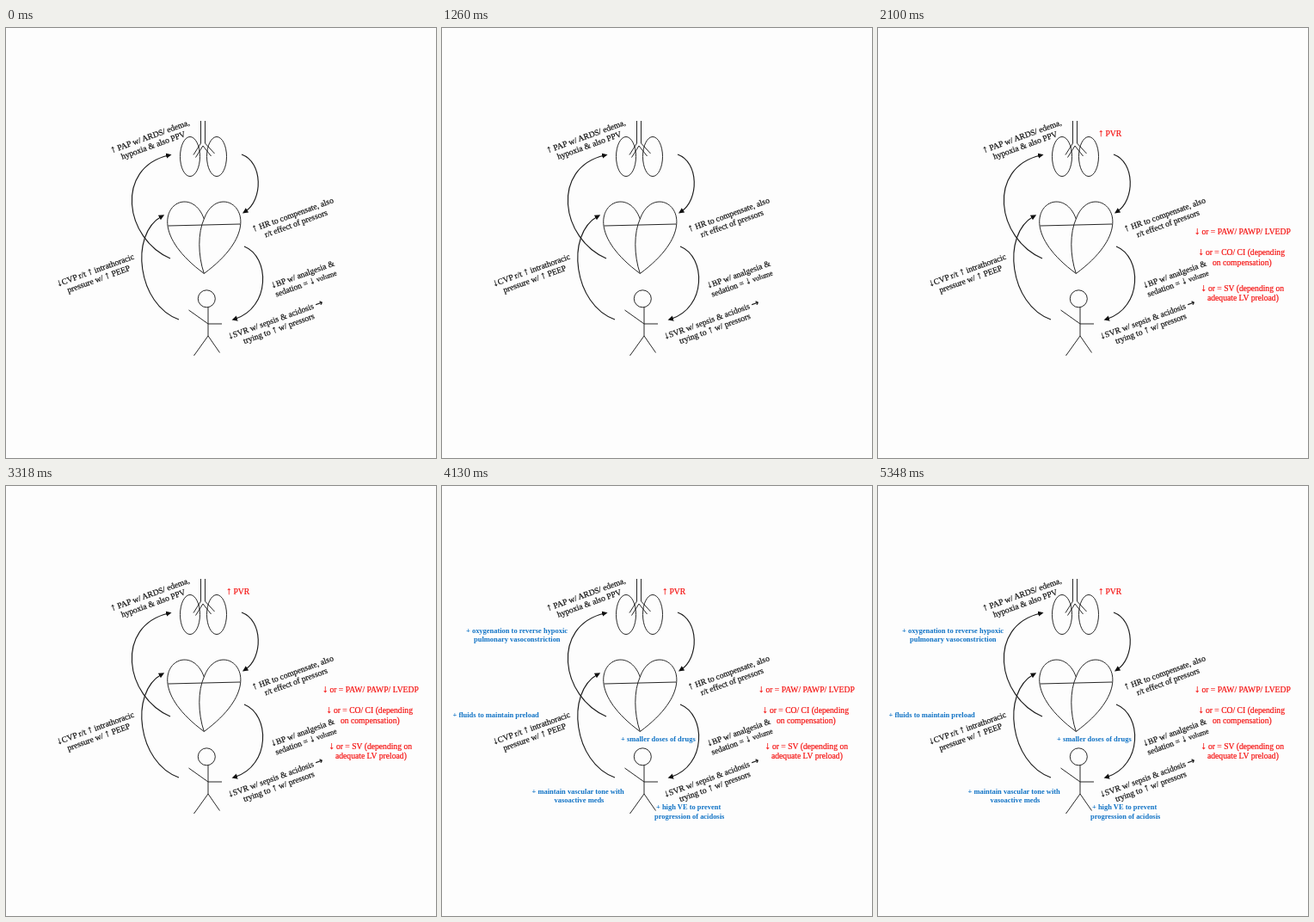
An HTML page for the animation above (6.16 s loop, 500x500 px).

```html
<!DOCTYPE html>
<html lang="en">
<head>
<meta charset="utf-8">
<title>Heart, lungs and body</title>
<style>
  html, body { margin: 0; width: 100%; height: 100%; overflow: hidden; background: #fdfdfd; }
  svg { display: block; width: 100%; height: 100%; }
  text { font-family: "Liberation Serif", "Times New Roman", serif; font-size: 9.65px; white-space: pre; }
  .lines { fill: none; stroke: #1c1c1c; stroke-width: 0.95; }
  #notes { fill: #111; stroke: #111; stroke-width: 0.2; text-anchor: middle; }
  #effects { fill: #f5100f; stroke: #f5100f; stroke-width: 0.2; }
  #actions { fill: #0f72c5; }
  #actions text { font-size: 8.45px; font-weight: bold; }
  .arrow { font-size: 12px; font-weight: bold; }
  .next { font-family: "DejaVu Sans", sans-serif; font-size: 11px; }
  .small { font-size: 8.2px; }
</style>
</head>
<body>
<svg viewBox="0 0 500 500">
  <defs>
    <marker id="head" markerUnits="userSpaceOnUse" markerWidth="7" markerHeight="7" refX="3" refY="3.2" orient="auto">
      <path d="M0 0L6.6 3.2L0 6.4Z" fill="#111"/>
    </marker>
  </defs>

  <g class="lines">
    <!-- lungs -->
    <ellipse cx="214" cy="149.5" rx="11.5" ry="23"/>
    <ellipse cx="245" cy="149.5" rx="11.5" ry="23"/>
    <path d="M226.5 108V134L218 147.500M231.5 108V134L242.500 146M220.500 150.500L229 137L238.500 149"/>
    <!-- heart -->
    <path d="M230.3 222C247.9 173 316.6 222 230.3 285.500C144 222 212.7 173 230.3 222C223 238 223 264 230.3 285.500M188.5 230L272.5 228"/>
    <!-- body -->
    <circle cx="233.3" cy="314.800" r="10"/>
    <path d="M235 325V358M212.5 328L235 344H251M218.5 381L235 358L248.5 377.500"/>
    <!-- circulation -->
    <g stroke-width="1.15" marker-end="url(#head)">
      <path d="M274 147C299 156 299 200 278 213.500"/>
      <path d="M277 254C307 266 308 325 266 338.500"/>
      <path d="M191 268C138 245 126 163 189 148"/>
      <path d="M201 339C153 322 143 240 181 219"/>
    </g>
  </g>

  <g id="notes"></g>
  <g id="effects"></g>
  <g id="actions"></g>
</svg>
<script>
const LOOP = 6160, EFFECTS_AT = 2100, ACTIONS_AT = 4130;
const notes = document.getElementById("notes");
const effects = document.getElementById("effects");
const actions = document.getElementById("actions");

// Parts of a line set in their own style.
const STYLES = { "↑": "arrow", "↓": "arrow", "→": "next", "volume": "small" };

function svgElement(tag, parent, content = "") {
  const element = document.createElementNS("http://www.w3.org/2000/svg", tag);
  element.textContent = content;
  return parent.appendChild(element);
}

function addText(group, x, y, content) {
  const text = svgElement("text", group);
  text.setAttribute("x", x);
  text.setAttribute("y", y);
  for (const part of content.split(/([↑↓→]|volume)/))
    svgElement("tspan", text, part).setAttribute("class", STYLES[part] || "");
  return text;
}

// Two centred lines, tilted around the middle of the first baseline.
function addNote(x, y, first, second) {
  [first, second].forEach((line, i) =>
    addText(notes, 0, i * 11, line).setAttribute("transform", `translate(${x} ${y}) rotate(-20)`));
}

addNote(168.5, 129, "↑ PAP w/ ARDS/ edema,", "hypoxia & also PPV");
addNote(334.5, 220, "↑ HR to compensate, also", "r/t effect of pressors");
addNote(105, 284.5, "↓CVP r/t ↑ intrathoracic", "pressure w/ ↑ PEEP");
addNote(346, 289.5, "↓BP w/ analgesia &", "sedation = ↓ volume");
addNote(314.5, 342, "↓SVR w/ sepsis & acidosis →", "trying to ↑ w/ pressors");

[
  [256, 125.5, "↑ PVR"],
  [368, 240, "↓ or = PAW/ PAWP/ LVEDP"],
  [372.5, 264, "↓ or = CO/ CI (depending"],
  [389, 275.5, "on compensation)"],
  [375.5, 306, "↓ or = SV (depending on"],
  [383, 317, "adequate LV preload)"],
].forEach(line => addText(effects, ...line));

[
  [28, 170.5, "+ oxygenation to reverse hypoxic"],
  [37, 180.5, "pulmonary vasoconstriction"],
  [12.5, 268.5, "+ fluids to maintain preload"],
  [208, 296.5, "+ smaller doses of drugs"],
  [104.5, 357.5, "+ maintain vascular tone with"],
  [130.5, 368, "vasoactive meds"],
  [249, 376, "+ high VE to prevent"],
  [247, 386.5, "progression of acidosis"],
].forEach(line => addText(actions, ...line));

const start = performance.now();
function draw() {
  const t = (performance.now() - start) % LOOP;
  effects.style.display = t >= EFFECTS_AT ? "" : "none";
  actions.style.display = t >= ACTIONS_AT ? "" : "none";
  requestAnimationFrame(draw);
}
draw();
</script>
</body>
</html>
```
